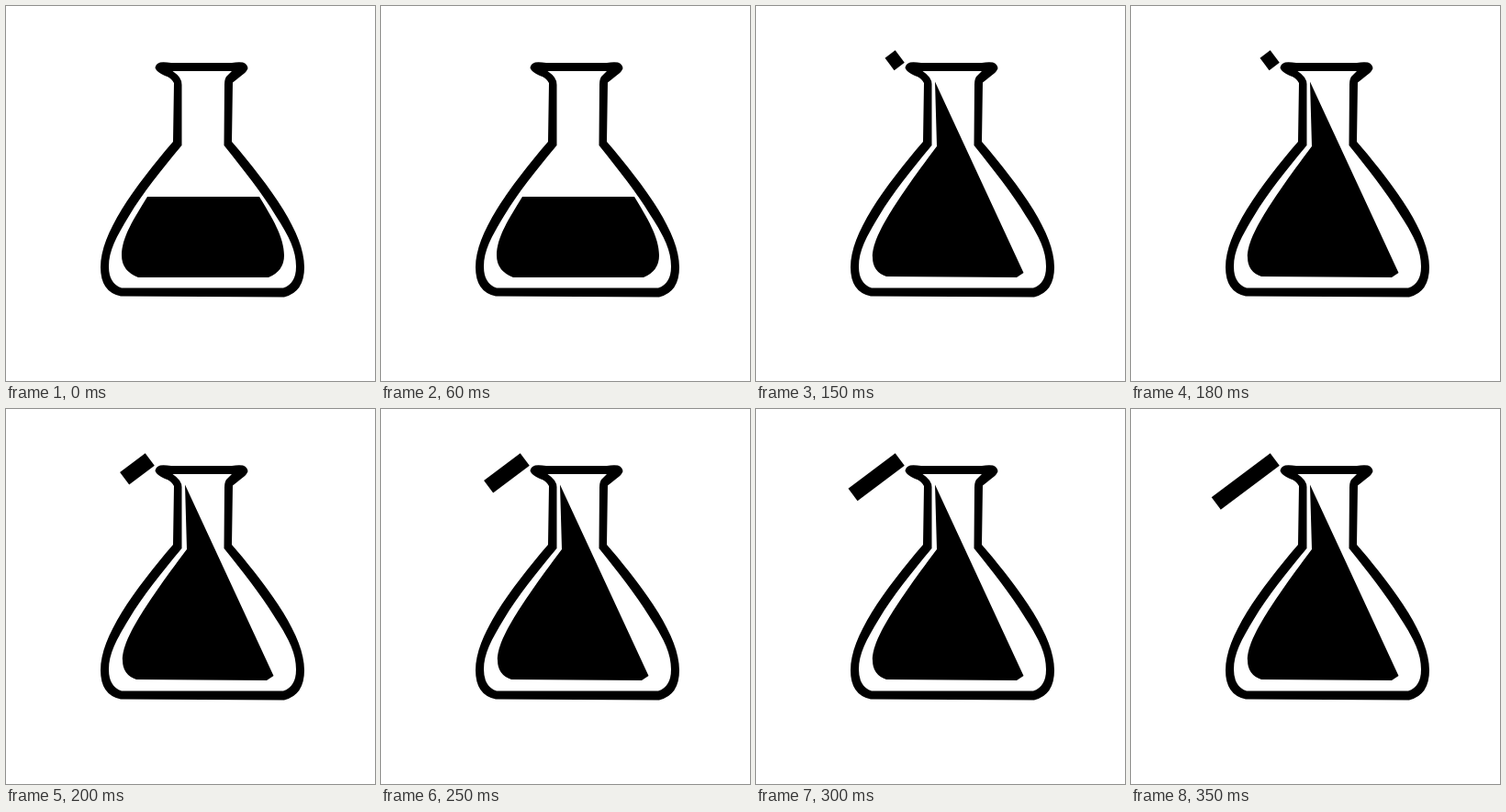
Write an HTML page that moves like this. It is 402 by 409 pixels and loops after 0.4 s.

```html
<!DOCTYPE html>
<html lang="en">
<head>
<meta charset="utf-8">
<title>Flask</title>
<style>
  html, body { margin: 0; width: 100%; height: 100%; overflow: hidden; background: #fff; }
  svg { display: block; width: 100%; height: 100%; }
</style>
</head>
<body>
<svg viewBox="0 0 402 409">
  <path d="M168 61.5 Q173 61 180 62 H246 Q252 61 258 61.5 Q263 63 263.5 68 Q262 72 257 75.5 L247 83.5
           L246 148 C266 171 287 198 302 222 C316 245 325 266 325 285 Q325 312 303 317.5
           L125 316.5 Q103 312 103 285 C103 266 112 245 126 222 C141 198 162 171 182 148
           L183 84 Q180 78 173 76 Q164 72 162.5 67.5 Q163 63 168 61.5 Z"/>
  <path fill="#fff" d="M181.5 71 H246 L240 77 Q238 80 238 86 L237.5 152 C259 179 279 204 294 229
           C309 252 316 267 316 284 Q316 303 302 307.5 H126 Q112 303 112 284
           C112 267 120 252 134 229 C149 204 169 179 191.5 152 V86 Q192 78 181.5 71 Z"/>
  <path id="liquid"/>
  <path id="bar"/>
</svg>
<script>
const LOOP = 400, STEP = 50, POUR_START = 100, BAR_START = 150;
const LEVEL = "M154 208 H276 C290 231 303 252 303 272 Q303 289 286 296 H144 Q126 289 126 272 C126 252 140 231 154 208 Z";
const TILTED = "M195 82.5 L291.5 291 L284 296 L142 295 Q127 290 127 274 C127 253 146 221 197 153 Z";
const BAR_LENGTHS = [14, 34.5, 49.5, 64, 80];
const BAR_WIDTH = 16.8;
const liquid = document.getElementById("liquid");
const bar = document.getElementById("bar");

// The bar grows down and left from its fixed end, along the direction (-0.8, 0.6).
function barPath(length) {
  const dx = -0.8 * length, dy = 0.6 * length;
  return `M151.7 48.3 l${0.6 * BAR_WIDTH} ${0.8 * BAR_WIDTH} l${dx} ${dy} ` +
         `l${-0.6 * BAR_WIDTH} ${-0.8 * BAR_WIDTH} Z`;
}

function render(time) {
  const t = time % LOOP;
  liquid.setAttribute("d", t < POUR_START ? LEVEL : TILTED);
  const length = BAR_LENGTHS[Math.floor((t - BAR_START) / STEP)];
  bar.setAttribute("d", length ? barPath(length) : "");
}

const start = performance.now();
function tick() {
  render(performance.now() - start);
  requestAnimationFrame(tick);
}
tick();
</script>
</body>
</html>
```
